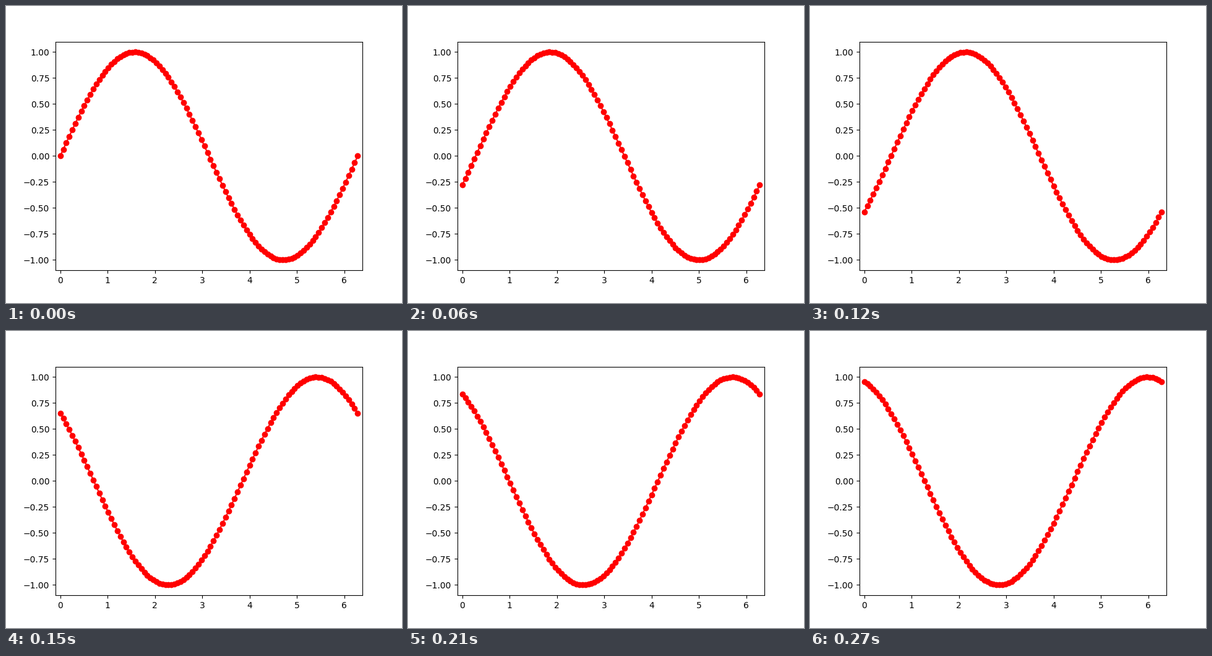
Write a matplotlib script that moves like this. It is 640 px wide and 480 px high and loops after 0.3 s.

```python
import numpy as np
import matplotlib.pyplot as plt
from matplotlib.animation import FuncAnimation

FRAMES = 10
INTERVAL = 30  # ms
PHASE_STEP = 3  # radians per frame

fig, ax = plt.subplots(figsize=(6.4, 4.8), dpi=100)
ax.set_xlim(-0.1, 2 * np.pi + 0.1)
ax.set_ylim(-1.1, 1.1)

x = np.linspace(0, 2 * np.pi, 100)
wave, = ax.plot(x, np.sin(x), "ro-")


def update(frame):
    wave.set_ydata(np.sin(x + PHASE_STEP * frame))
    return wave,


anim = FuncAnimation(fig, update, frames=FRAMES, interval=INTERVAL,
                     repeat=True, repeat_delay=0)
plt.show()
```
